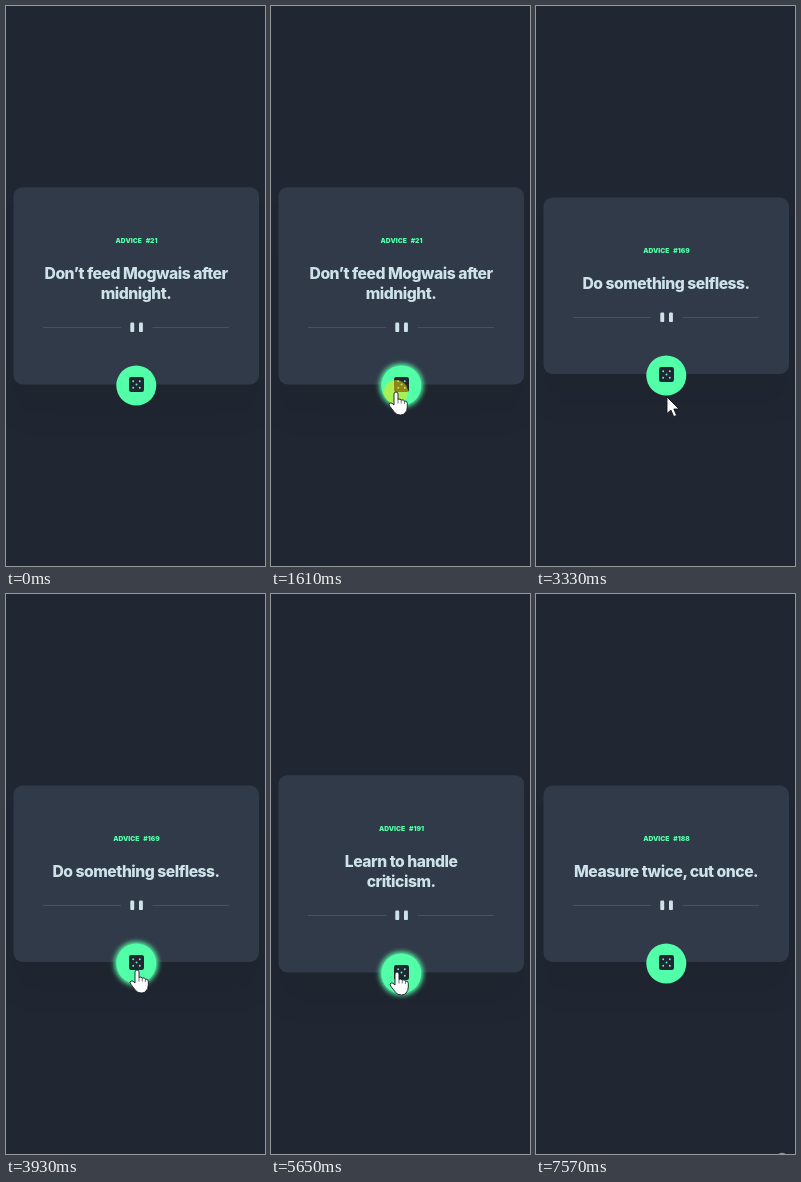
These frames come from a looping animation (259x560 px, 7.77 s). An HTML page:

```html
<!DOCTYPE html>
<html lang="en">
<head>
<meta charset="utf-8">
<title>Advice card</title>
<style>
  html, body { margin: 0; width: 100%; height: 100%; overflow: hidden; background: #202732; }
  svg { display: block; width: 259px; height: 560px; }
  text { font-family: Inter, "Open Sans", sans-serif; text-anchor: middle; }
  #label { font-size: 6.7px; font-weight: 900; word-spacing: 2.6px; fill: #52ffa8; }
  .quote { font-size: 15.7px; font-weight: 800; letter-spacing: -.48px; fill: #cee3e9; }
  .soft { filter: blur(15px); }
  #glow { filter: blur(2.4px); }
</style>
</head>
<body>
<svg viewBox="0 0 259 560">
  <rect id="shade" class="soft" x="7.5" width="245.5" rx="9" fill="#000" opacity=".05"/>
  <rect id="card" x="7.5" width="245.5" rx="9" fill="#313a48"/>
  <text id="label" x="130.5"></text>
  <text id="line1" class="quote" x="130.1"></text>
  <text id="line2" class="quote" x="130.1"></text>
  <g id="foot">
    <path d="M37 -58H115M146.5 -58H223" stroke="#475163"/>
    <g fill="#cee3e9">
      <rect x="124.3" y="-63" width="3.9" height="9.6" rx="1.2"/>
      <rect x="133" y="-63" width="3.9" height="9.6" rx="1.2"/>
    </g>
    <circle id="glow" cx="130.3" r="21.8" fill="#52ffa8"/>
    <circle cx="130.3" r="20" fill="#52ffa8"/>
    <rect x="123" y="-8.5" width="15" height="15" rx="2.2" fill="#202732"/>
    <g fill="#52ffa8">
      <circle cx="127.2" cy="-4.3" r=".95"/><circle cx="133.8" cy="-4.3" r=".95"/>
      <circle cx="130.5" cy="-1" r=".95"/>
      <circle cx="127.2" cy="2.3" r=".95"/><circle cx="133.8" cy="2.3" r=".95"/>
    </g>
  </g>
  <g id="pointer" stroke="#15181e" stroke-width=".9" stroke-linejoin="round" fill="#fff">
    <circle id="press" r="12" fill="#ffe100" fill-opacity=".5" stroke="none"/>
    <path id="arrow" d="M0 0V16.5L3.9 13L6.7 19.6L9.6 18.4L6.8 12H12Z"/>
    <g id="hand">
      <path d="M-2 2Q-2 0 0 0Q2 0 2 2V7.3Q4.3 6.4 5.2 8Q7.4 7.2 8.4 9Q11.3 8.7 11.3 11.4V15Q11.3 19 9 21Q7.6 23 4.5 23Q.5 23 -1.4 20.4L-6.4 14Q-7.8 11.6 -6 11Q-4.2 10.4 -2 13Z"/>
      <path d="M2 7V11.5M5.2 8V11.5M8.4 9V12" fill="none" stroke-width=".6"/>
    </g>
  </g>
  <circle id="knob" cx="246" cy="564.3" r="5.6" fill="#8b9099"/>
</svg>
<script>
const LOOP = 7770, STEP = 100;
const $ = id => document.getElementById(id);
const set = (id, name, value) => $(id).setAttribute(name, value);
const show = (id, on) => set(id, "visibility", on ? "visible" : "hidden");
const clamp = v => Math.min(1, Math.max(0, v));

// The number arrives first, the quote a moment later.
const advice = [
  { num: 21, numAt: 0, at: 0, lines: ["Don’t feed Mogwais after", "midnight."] },
  { num: 169, numAt: 2030, at: 2320, lines: ["Do something selfless."] },
  { num: 191, numAt: 4150, at: 4450, lines: ["Learn to handle", "criticism."] },
  { num: 188, numAt: 6260, at: 6470, lines: ["Measure twice, cut once."] }
];

// Pointer keys: time, x, y
const path = [
  [710, 177, 535], [1010, 150, 455], [1310, 128, 403], [1410, 125, 386],
  [2630, 125, 386], [2730, 130, 398], [3030, 146, 461], [3130, 143, 450],
  [3330, 131, 391], [3430, 131, 383], [3530, 131, 376],
  [4850, 131, 376], [4950, 134, 404], [5250, 147, 441], [5450, 130, 397], [5650, 126, 378],
  [6770, 126, 378], [6870, 136, 401], [7270, 239, 550], [7370, 245, 585]
];
const hovers = [[1410, 2730], [3430, 4950], [5450, 6870]];
const presses = [[1610, 1810], [3730, 3930], [5850, 6070]];

function pointerAt(t) {
  const i = path.findLastIndex(k => k[0] <= t);
  if (i < 0) return null;
  const a = path[i], b = path[i + 1];
  if (!b) return [a[1], a[2]];
  const p = Math.floor((t - a[0]) / STEP) * STEP / (b[0] - a[0]);
  return [a[1] + (b[1] - a[1]) * p, a[2] + (b[2] - a[2]) * p];
}

const ramp = (t, start) => clamp((Math.floor((t - start) / STEP) + 1) / 3);

function draw(t) {
  const { lines } = advice.findLast(a => a.at <= t);
  const { num } = advice.findLast(a => a.numAt <= t);
  const two = lines.length > 1;
  const top = two ? 181.2 : 191.5, height = two ? 197.3 : 176.5;
  const button = two ? 379.5 : 369.5;

  set("card", "y", top);
  set("card", "height", height);
  set("shade", "y", top + 30);
  set("shade", "height", height);
  set("label", "y", two ? 237 : 247);
  $("label").textContent = "ADVICE #" + num;
  set("line1", "y", two ? 273 : 283);
  set("line2", "y", 293);
  $("line1").textContent = lines[0];
  $("line2").textContent = lines[1] || "";
  set("foot", "transform", `translate(0 ${button})`);
  set("glow", "opacity", hovers.reduce((sum, [on, off]) => sum + ramp(t, on) - ramp(t, off), 0));

  const pos = pointerAt(t);
  set("pointer", "display", pos ? "inline" : "none");
  if (pos) {
    const over = Math.hypot(pos[0] - 130.3, pos[1] - button) < 20.2;
    set("pointer", "transform", `translate(${pos})`);
    show("hand", over);
    show("arrow", !over);
    show("press", presses.some(([a, b]) => t >= a && t < b));
  }
  show("knob", t >= 7570);
}

const begin = performance.now();
function tick() {
  draw((performance.now() - begin) % LOOP);
  requestAnimationFrame(tick);
}
tick();
</script>
</body>
</html>
```
